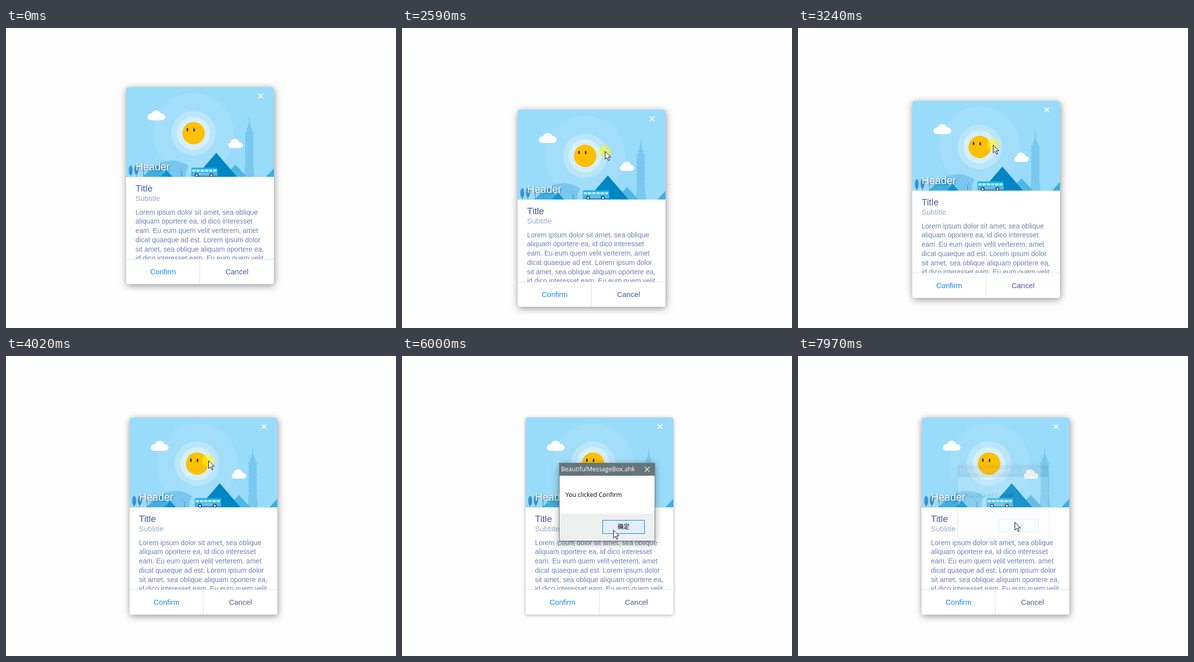
An HTML page that plays this animation: 792x609 px, repeating every 8000 ms.

```html
<!DOCTYPE html>
<html lang="en">
<head>
<meta charset="utf-8">
<title>Message box</title>
<style>
html, body { margin: 0; width: 100%; height: 100%; overflow: hidden; background: #fefefe; }
svg { display: block; }
text { font-family: "Liberation Sans", Arial, sans-serif; }
.ui { font-family: "Open Sans", "Noto Sans", sans-serif; font-size: 12.5px; }
.cjk { font-family: "Noto Sans CJK SC", "Noto Sans CJK", sans-serif; font-size: 12px; }
.mid { text-anchor: middle; }
#panel { filter: drop-shadow(1px 3px 7.5px rgba(0,0,0,.43)); }
#panel.idle { filter: drop-shadow(0 1px 3.5px rgba(0,0,0,.34)); }
#frame { filter: drop-shadow(0 4px 8px rgba(0,0,0,.36)); }
#header { filter: drop-shadow(1px 1.5px 1.5px rgba(0,0,0,.5)); }
</style>
</head>
<body>
<svg width="792" height="609" viewBox="0 0 792 609">
  <defs>
    <clipPath id="round"><rect width="300" height="400" rx="4.5"/></clipPath>
    <clipPath id="pane"><rect y="183" width="300" height="166"/></clipPath>
    <clipPath id="scene"><rect width="300" height="182"/></clipPath>
  </defs>

  <g id="card">
    <rect id="panel" width="300" height="400" rx="4.5" fill="#fff"/>
    <g clip-path="url(#round)">
      <g clip-path="url(#scene)">
        <rect width="300" height="182" fill="#99dbfa"/>
        <g transform="translate(137 93.5)">
          <circle r="82" fill="#a2defa"/>
          <circle r="45" fill="#bae6fc"/>
          <circle r="33.5" fill="#d4f0fc"/>
          <circle r="22.8" fill="#ffc000"/>
          <ellipse cx="-12.5" cy="-7" rx="1.6" ry="3.4" fill="#222c3c"/>
          <ellipse cx="1" cy="-6.5" rx="1.6" ry="3.4" fill="#222c3c"/>
        </g>
        <g fill="#fff">
          <rect x="43" y="54" width="36" height="13.3" rx="6.6"/>
          <circle cx="61" cy="57.3" r="10.3"/>
          <rect x="207.5" y="112.5" width="29.5" height="11.2" rx="5.6"/>
          <circle cx="221" cy="114.3" r="9.4"/>
        </g>
        <path id="tower" fill="#79c8ef"/>
        <path d="M34 182C54 158 72 149 95 149Q114 150 127 160Q121 168 121 182Z" fill="#78c7ef"/>
        <path d="M34 182L60 158Q63 156 66 160L84 182Z" fill="#3fafe3"/>
        <path d="M70 182L82 168.5L94 182Z" fill="#0a93d6"/>
        <path d="M198 182L222 157L245 182Z" fill="#4fb6e4"/>
        <path d="M141 182L183 133.3L225 182Z" fill="#0086c3"/>
        <path d="M284 182L301 164V182Z" fill="#3aaee2"/>
        <g fill="#3f93cf">
          <ellipse cx="9.3" cy="169" rx="4" ry="10"/>
          <ellipse cx="20.7" cy="168" rx="4" ry="10"/>
        </g>
        <path d="M9.3 168V182M20.7 168V182M35.5 160V182M112.3 170V182" stroke="#3c7fae" fill="none"/>
        <circle cx="112.3" cy="168" r="2.3" fill="#b5e4fa" stroke="#4798c6"/>
        <rect x="132.5" y="163.5" width="53" height="16.5" rx="2" fill="#18b2ea"/>
        <path d="M134 169.5H184" stroke="#b4e7fb" stroke-width="5" stroke-dasharray="7.2 1.3"/>
        <rect x="132" y="173" width="54" height="7.5" rx="1.5" fill="#56b1df"/>
        <path d="M149 176.5H167" stroke="#a5d9f1" stroke-width="5" stroke-dasharray="1 2.2"/>
        <path d="M132 180.5H186" stroke="#2f86ba"/>
        <g fill="#e2f4fd" stroke="#164c78" stroke-width="1.8">
          <circle cx="143" cy="179" r="3"/>
          <circle cx="173" cy="179" r="3"/>
        </g>
      </g>
      <path d="M0 182.5H300" stroke="#dcebf4"/>
      <rect id="hover" y="350" width="150" height="50" fill="#f5f8fd"/>
    </g>
    <path d="M268.5 13.5L277.7 22.7M277.7 13.5L268.5 22.7" stroke="#fff" stroke-width="1.9"/>
    <text id="header" x="19" y="169" font-size="21.33" fill="#fff">Header</text>
    <text x="19" y="212" font-size="18.67" fill="#465a96">Title</text>
    <text x="19" y="231" font-size="15" fill="#94a8c8">Subtitle</text>
    <g id="copy" clip-path="url(#pane)" font-size="14" fill="#6b82b3"></g>
    <path d="M0 349.5H300M149.5 350V400" stroke="#d9deea" fill="none"/>
    <text class="mid" x="75" y="380" font-size="15" fill="#0e88ee">Confirm</text>
    <text class="mid" x="225" y="380" font-size="15" fill="#465a96">Cancel</text>
  </g>

  <g id="dialog">
    <rect id="frame" x="319" y="217" width="195" height="159" fill="#66757a"/>
    <rect x="320" y="243" width="193" height="77" fill="#fff"/>
    <rect x="320" y="320" width="193" height="55" fill="#eef0ef"/>
    <text class="ui" x="323" y="234" fill="#fff">BeautifulMessageBox.ahk</text>
    <path d="M493 225L503 235M503 225L493 235" stroke="#fff" stroke-width="1.2"/>
    <text class="ui" id="note" x="332" y="286" fill="#000"></text>
    <rect x="407.5" y="333.5" width="85" height="27" fill="#e2edf6" stroke="#0078d7"/>
    <text class="cjk mid" x="450" y="351" fill="#000">确定</text>
  </g>

  <g id="cursor">
    <circle id="spot" r="12.3" fill="#fff51e" fill-opacity=".58"/>
    <path d="M.5 .5V16.5L4.2 13L6.9 19L9.4 17.9L6.8 12H11.8Z" fill="#fff" stroke="#000"/>
  </g>
</svg>

<script>
const LOOP = 8000, OPEN = 200, CLOSE = 125, LAG = 55;
const $ = id => document.getElementById(id);
const clamp = v => Math.max(0, Math.min(1, v));
const progress = (t, from, to) => clamp((t - from) / (to - from));
const smooth = v => v * v * (3 - 2 * v);
const easeOut = (v, power) => 1 - (1 - v) ** power;
const mix = (a, b, u) => a.map((v, k) => v + (b[k] - v) * u);

const ENTRY = [470, 620], SUN = [404, 207], REST = [411, 212];
const GRAB = [160, 87];

// Straight eased moves; each starts where the pointer was left
const moves = [
  { from: 1000, to: 1690, start: ENTRY, end: SUN },
  { from: 4500, to: 5240, start: REST, end: [345, 502] },
  { from: 5520, to: 6000, start: [345, 502], end: [429, 353] },
  { from: 6320, to: 6880, start: [429, 353], end: [470, 504] },
  { from: 7150, to: 7710, start: [470, 504], end: [440, 337] }
];
// Circling drags: sideways swing, drop, and tilt of the loop
const drags = [
  { from: 2170, to: 2960, start: SUN, end: SUN, swing: 38, drop: 45, tilt: 7, power: 1 },
  { from: 3040, to: 3760, start: SUN, end: REST, swing: 14, drop: 20, tilt: 15.5, power: 1.4 }
];
const steps = [...moves, ...drags].sort((a, b) => a.from - b.from);

const dialogs = [
  { from: 5460, to: 6230, name: "Confirm" },
  { from: 7090, to: 7860, name: "Cancel" }
];
const clicks = [5320, 6130, 6950, 7770];
const pressed = t => (t >= 1690 && t < 4290) || clicks.some(c => t >= c && t < c + 125);

function pointer(t) {
  const s = steps.findLast(s => t >= s.from) || steps[0];
  const u = progress(t, s.from, s.to);
  if (!s.swing) return mix(s.start, s.end, smooth(u));
  const v = easeOut(u, s.power), angle = 2 * Math.PI * v;
  const [x, y] = mix(s.start, s.end, v);
  return [
    x - s.swing * Math.sin(angle),
    y + s.drop * (1 - Math.cos(angle)) / 2 + s.tilt * Math.sin(angle)
  ];
}

// The card trails the pointer while it is held
function cardAt(t) {
  const held = Math.max(drags[0].from, Math.min(drags[1].to, t - LAG));
  return pointer(held).map((v, k) => Math.round(v - GRAB[k]));
}

function buildTower() {
  const half = [];
  for (let i = 0; i < 4; i++) {
    const w = .8 + i * i / 2;
    half.push([62 + 7 * i, w], [69 + 7 * i, w]);
  }
  for (let i = 0; i < 8; i++) half.push([90 + i * 8, 9], [97.5 + i * 8, 7.4]);
  half.push([154, 8], [182, 10.5]);
  const side = sign => half.map(([y, w]) => `${250 + sign * w} ${y}`);
  $("tower").setAttribute("d", "M" + [...side(-1), ...side(1).reverse()].join("L") + "Z");
}

function buildCopy() {
  ["Lorem ipsum dolor sit amet, sea oblique",
   "aliquam oportere ea, id dico interesset",
   "eam. Eu eum quem velit verterem, amet",
   "dicat quaeque ad est. Lorem ipsum dolor",
   "sit amet, sea oblique aliquam oportere ea,",
   "id dico interesset eam. Eu eum quem velit"
  ].forEach((line, i) => {
    const el = document.createElementNS("http://www.w3.org/2000/svg", "text");
    el.setAttribute("x", 19);
    el.setAttribute("y", Math.floor(259 + i * 18.75));
    el.textContent = line;
    $("copy").append(el);
  });
}

function drawDialog(t) {
  const box = dialogs.find(d => t >= d.from && t < d.to + CLOSE);
  $("dialog").style.display = box ? "" : "none";
  $("panel").classList.toggle("idle", !!box && t < box.to);
  if (!box) return;
  const shown = easeOut(progress(t, box.from, box.from + OPEN), 3);
  const closing = progress(t, box.to, box.to + CLOSE);
  const scale = (.9 + .1 * shown) * (1 - .06 * closing);
  $("note").textContent = "You clicked " + box.name;
  $("dialog").setAttribute("opacity", shown * (1 - closing));
  $("dialog").setAttribute("transform", `translate(416 296) scale(${scale}) translate(-416 -296)`);
}

function draw(t) {
  const [cx, cy] = cardAt(t), [px, py] = pointer(t).map(Math.round);
  $("card").setAttribute("transform", `translate(${cx} ${cy})`);

  const x = px - cx, y = py - cy;
  const over = t >= 1000 && x >= 0 && x < 300 && y >= 350 && y < 400;
  $("hover").style.display = over ? "" : "none";
  $("hover").setAttribute("x", x < 150 ? 0 : 150);

  drawDialog(t);
  $("cursor").style.display = t >= 1000 ? "" : "none";
  $("cursor").setAttribute("transform", `translate(${px} ${py})`);
  $("spot").style.display = pressed(t) ? "" : "none";
}

buildTower();
buildCopy();
const start = performance.now();
function tick() {
  draw((performance.now() - start) % LOOP);
  requestAnimationFrame(tick);
}
tick();
</script>
</body>
</html>
```
